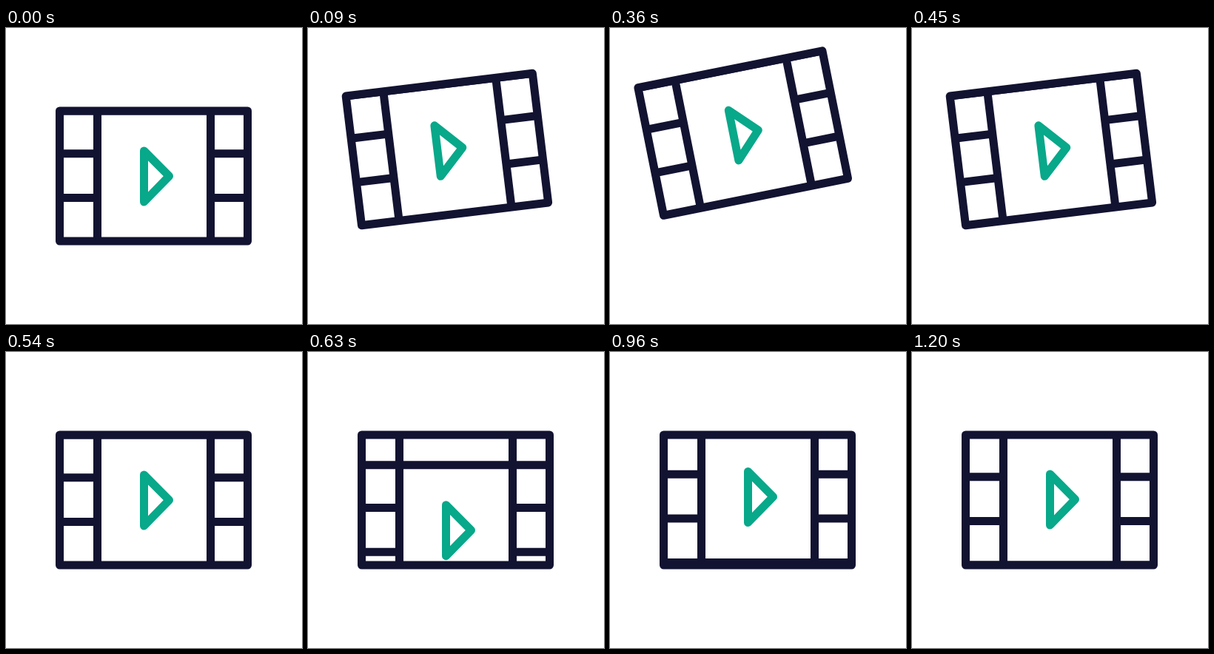
An HTML page for the animation above (3.26 s loop, 400 px wide and 400 px high).

```html
<!DOCTYPE html>
<html lang="en">
<head>
<meta charset="utf-8">
<title>Film strip</title>
<style>
  html, body { margin: 0; width: 100%; height: 100%; overflow: hidden; background: #fff; }
  svg { display: block; width: 100%; height: 100%; }
  .line { fill: none; stroke: #121331; stroke-width: 11; stroke-linejoin: round; }
  .play { fill: none; stroke: #08a88a; stroke-width: 11; stroke-linejoin: round; }
</style>
</head>
<body>
<svg viewBox="0 0 400 400">
  <defs>
    <clipPath id="window"><rect x="72.5" y="112" width="254" height="176"/></clipPath>
    <g id="cell">
      <path class="play" d="M186.5 166V235L220.5 200.2Z"/>
      <path class="line" d="M72.5 112H326.5M72.5 169.7H123.5M72.5 229.5H123.5M276.5 169.7H326.5M276.5 229.5H326.5"/>
    </g>
  </defs>
  <g id="film">
    <g clip-path="url(#window)">
      <g id="reel">
        <use href="#cell"/>
        <use href="#cell" y="-177"/>
      </g>
    </g>
    <path class="line" d="M123.5 112V288M276.5 112V288"/>
    <rect class="line" x="72.5" y="112" width="254" height="176"/>
  </g>
</svg>
<script>
  const LOOP = 3260, STEP = 30, END = 1200;
  const HOP = 540, LIFT = 39.6, TILT = 12.95;
  const TRAVEL = 176, SPEED = 0.452, TAU = 43;
  const film = document.getElementById('film');
  const reel = document.getElementById('reel');

  // Rises and falls like a thrown object: 0 -> 1 -> 0
  function hop(t) {
    if (t >= HOP) return 0;
    return 1 - Math.pow(Math.abs(2 * t / HOP - 1), 1.9);
  }

  // Steady roll, then an exponential settle with matching speed
  function roll(t) {
    if (t <= 0) return 0;
    const brake = TRAVEL / SPEED - TAU;
    if (t < brake) return SPEED * t;
    return TRAVEL - SPEED * TAU * Math.exp((brake - t) / TAU);
  }

  function draw(time) {
    const t = Math.min(Math.floor(time / STEP) * STEP, END);
    const h = hop(t);
    film.setAttribute('transform', `translate(0 ${-LIFT * h}) rotate(${-TILT * h} 72.5 288)`);
    reel.setAttribute('transform', `translate(0 ${roll(t - HOP)})`);
  }

  const start = performance.now();
  function tick() {
    draw((performance.now() - start) % LOOP);
    requestAnimationFrame(tick);
  }
  tick();
</script>
</body>
</html>
```
